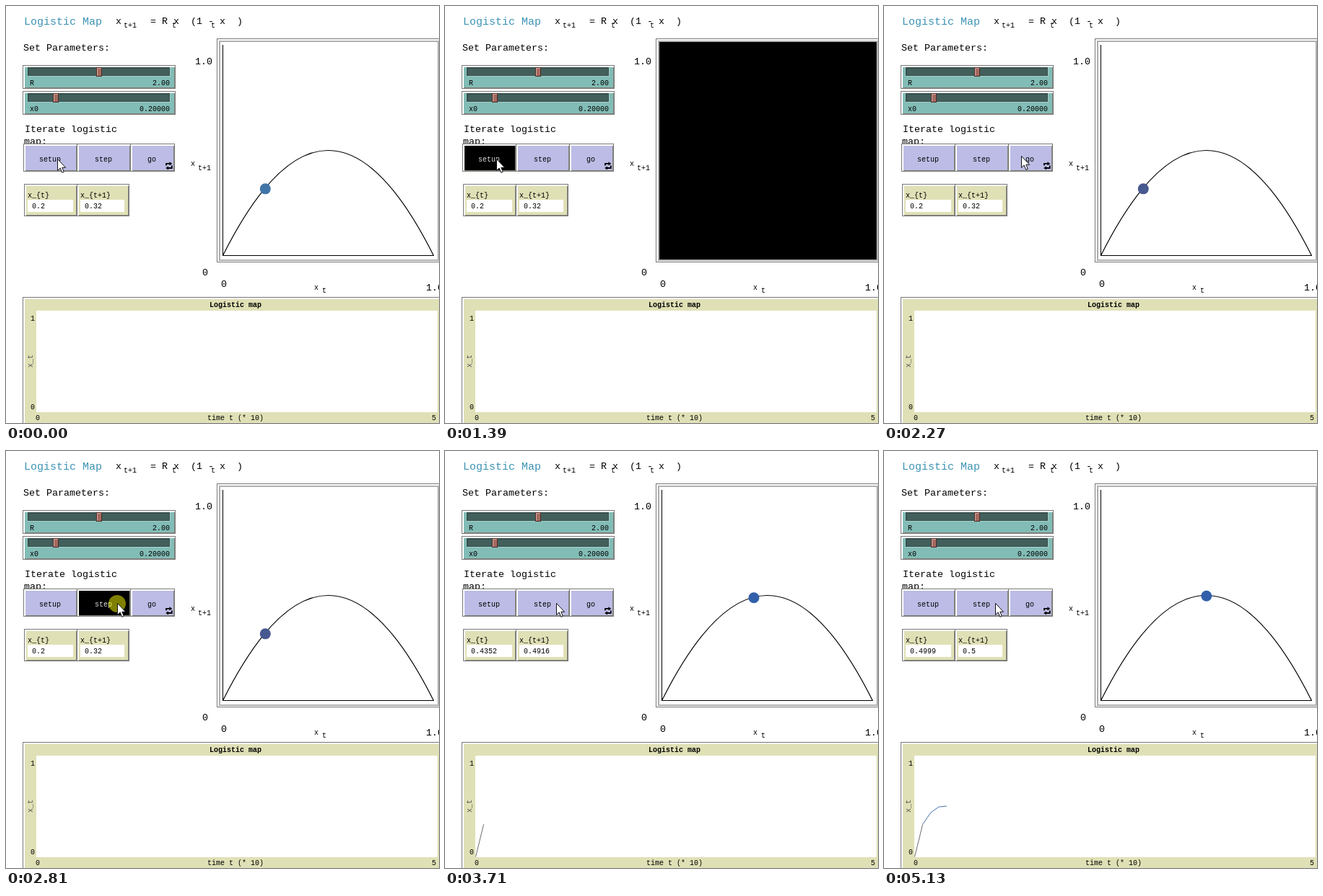
Animation, 600 px wide and 579 px high, one loop 5.53 s. Source, as an HTML page:

```html
<!DOCTYPE html>
<html lang="en">
<head>
<meta charset="utf-8">
<title>Logistic map</title>
<style>
html, body { margin: 0; width: 100%; height: 100%; overflow: hidden; background: #fff; }
svg { display: block; width: 600px; height: 579px; }
text { font-family: "Liberation Mono", "DejaVu Sans Mono", monospace; font-size: 10px; white-space: pre; }
.big { font-size: 13.333px; }
.head { font-size: 15px; fill: #3c93b4; }
</style>
</head>
<body>
<svg id="stage" viewBox="0 0 600 579" xmlns="http://www.w3.org/2000/svg"></svg>
<script>
const LOOP = 5530;
const stage = document.getElementById('stage');

const rect = (x, y, w, h, fill, extra = '') =>
  `<rect x="${x}" y="${y}" width="${w}" height="${h}" fill="${fill}" ${extra}/>`;
const text = (x, y, s, cls = '', extra = '') =>
  `<text x="${x}" y="${y}" class="${cls}" ${extra}>${s}</text>`;
const line = (x1, y1, x2, y2, color) =>
  `<path d="M${x1} ${y1}L${x2} ${y2}" stroke="${color}" fill="none"/>`;

// Raised panel: grey rim, light upper left edge, darker lower right edge.
const panel = (x, y, w, h, fill, id = '') =>
  rect(x, y, w, h, '#777') + rect(x + 1, y + 1, w - 2, h - 2, '#fff') +
  rect(x + 3, y + 3, w - 4, h - 4, '#85857c') +
  rect(x + 3, y + 3, w - 5, h - 5, fill, id && `id="${id}"`);

const slider = (y, name, value, knob) =>
  panel(23, y, 212, 33, '#82bcb6') +
  rect(30, y + 3, 198, 13, '#a5d0cb') + rect(30, y + 3, 197, 12, '#37504d') +
  rect(32, y + 5, 194, 9, '#425f5c') +
  rect(knob, y + 3, 8, 13, '#4b2c28') + rect(knob + 1, y + 4, 6, 11, '#d9aaa0') +
  rect(knob + 2, y + 5, 5, 10, '#a5695f') +
  text(33, y + 28, name) + text(227, y + 28, value, '', 'text-anchor="end"');

const button = (x, w, label, tx) =>
  panel(x, 191, w, 39, '#bcbce6', 'bg-' + label) +
  text(tx, 216, label, '', `id="tx-${label}"`);

const monitor = (x, w, field, label, id) =>
  panel(x, 247, w, 45, '#e0e0b6') + text(x + 5, 266, label) +
  rect(x + 5, 269, field, 17, '#fff') + text(x + 11, 281, '', '', `id="${id}"`);

// Logistic curve geometry
const SIZE = 292, R = 2;
const next = x => R * x * (1 - x);
const orbit = [0.2];
for (let i = 0; i < 5; i++) orbit.push(next(orbit[i]));

const plotPoint = i => [42.5 + i * 11.12, 563.5 - (i ? orbit[i] : 0) * 141];
const segments = [1, 2, 3, 4].map(i =>
  `<path id="seg${i}" d="M${plotPoint(i - 1)}L${plotPoint(i)}" stroke="${i > 1 ? '#4670aa' : '#6c6c70'}" fill="none"/>`
).join('');

stage.innerHTML = [
  text(25, 26, 'Logistic Map', 'head'),
  text(152, 25, 'x     = R x  (1 - x  )', 'big'),
  text(163, 30, 't+1'), text(230, 30, 't'), text(284, 30, 't'),
  text(24, 62, 'Set Parameters:', 'big'),
  slider(82, 'R', '2.00', 125),
  slider(118, 'x0', '0.20000', 65),
  text(26, 175, 'Iterate logistic', 'big'),
  text(25, 192, 'map:', 'big'),
  button(24, 75, 'setup', 46),
  button(98, 75, 'step', 123),
  button(172, 62, 'go', 196),
  '<g fill="none" stroke="#000" stroke-width="1.8"><path d="M222 221.5V218.8H227.5M229.8 221.5V225H224"/></g>',
  '<path d="M226.5 216.3L230.3 219L226.5 221.6ZM225 222.4L221.2 225L225 227.6Z"/>',
  monitor(25, 74, 63, 'x_{t}', 'now'),
  monitor(98, 73, 61, 'x_{t+1}', 'then'),

  // map view
  rect(292, 45, 320, 311, '#777'), rect(293, 46, 319, 309, '#fff'),
  rect(295, 48, 317, 306, '#b0b0b0'), rect(297, 50, 301, 302, '#fff'),
  line(300.5, 54, 300.5, 347, '#000'), line(300, 346.5, 593, 346.5, '#000'),
  `<path d="M300.5 346.5Q${300.5 + SIZE / 2} ${346.5 - SIZE} ${300.5 + SIZE} 346.5" fill="none" stroke="#000" stroke-width="1.2"/>`,
  '<circle id="dot" r="7.5"/>',
  rect(297, 50, 301, 302, '#000', 'id="blank"'),
  text(262, 81, '1.0', 'big'), text(272, 374, '0', 'big'),
  text(256, 222, 'x'), text(266, 228, 't+1'),
  text(298, 390, '0', 'big'), text(427, 394, 'x'),
  text(438, 398, 't'), text(582, 395, '1.0', 'big'),

  // time plot
  panel(23, 404, 600, 200, '#e0e0b6'),
  rect(42, 423, 556, 141, '#fff'),
  text(282, 418, 'Logistic map', '', 'font-weight="bold"'),
  text(34, 437, '1'), text(34, 560, '0'),
  text(0, 0, 'x_t', '', 'transform="translate(37 502) rotate(-90)" fill="#555"'),
  text(41, 575, '0'), text(279, 575, 'time t (* 10)'), text(590, 575, '5'),
  segments,

  '<circle id="glow" r="12" fill="#ff0" fill-opacity=".5"/>',
  '<path id="arrow" d="M.5 .5V16.5L4.2 13L6.8 19.4L9.3 18.3L6.8 12.3H11.6Z" fill="#fff" stroke="#111" stroke-linejoin="round"/>'
].join('');

const el = id => document.getElementById(id);
const show = (id, on) => el(id).setAttribute('visibility', on ? 'visible' : 'hidden');
const move = (id, x, y) => el(id).setAttribute('transform', `translate(${x} ${y})`);

// Clicks: glow on, button down, value change, glow off, button up
const clicks = [
  { name: 'setup', glow: 1320, down: 1320, value: 1390, dim: 1390, up: 1460 },
  { name: 'step', glow: 2800, down: 2800, value: 2870, dim: 2940, up: 3010 },
  { name: 'step', glow: 3430, down: 3500, value: 3570, dim: 3640, up: 3710 },
  { name: 'step', glow: 4110, down: 4110, value: 4180, dim: 4250, up: 4320 },
  { name: 'step', glow: 4720, down: 4720, value: 4790, dim: 4860, up: 4930 }
];
const drawn = [3230, 3910, 4520, 5130];

// Cursor travels: the pointer is sampled at fixed steps
const travels = [
  { start: 1660, step: 67.5, count: 10, from: [72, 213], to: [191, 209] },
  { start: 2600, step: 69, count: 3, from: [191, 209], to: [155, 212] }
];

function pointer(t) {
  let at = travels[0].from;
  for (const { start, step, count, from, to } of travels) {
    if (t < start) break;
    const u = Math.min(1, (Math.floor((t - start) / step) + 1) / count);
    const k = 0.65 * u + 0.35 * u * u * (3 - 2 * u);
    at = from.map((a, i) => Math.round(a + (to[i] - a) * k));
  }
  return at;
}

function draw(t) {
  const [px, py] = pointer(t);
  move('arrow', px - 1, py - 1);
  move('glow', px - 1, py);
  show('glow', clicks.some(c => t >= c.glow && t < c.dim));

  for (const name of ['setup', 'step']) {
    const down = clicks.some(c => c.name === name && t >= c.down && t < c.up);
    el('bg-' + name).setAttribute('fill', down ? '#000' : '#bcbce6');
    el('tx-' + name).setAttribute('fill', down ? '#ddd' : '#000');
  }

  const n = clicks.filter(c => c.name === 'step' && t >= c.value).length;
  const x = orbit[n], y = orbit[n + 1];
  el('now').textContent = +x.toFixed(4);
  el('then').textContent = +y.toFixed(4);
  move('dot', 300.9 + x * SIZE, 347.3 - y * SIZE);
  el('dot').setAttribute('fill', n ? '#315fa9' : t < 1390 ? '#4175a8' : '#48598f');
  show('blank', t >= 1390 && t < 1460);
  drawn.forEach((at, i) => show('seg' + (i + 1), t >= at));
}

const begin = performance.now();
function tick() {
  draw((performance.now() - begin) % LOOP);
  requestAnimationFrame(tick);
}
tick();
</script>
</body>
</html>
```
